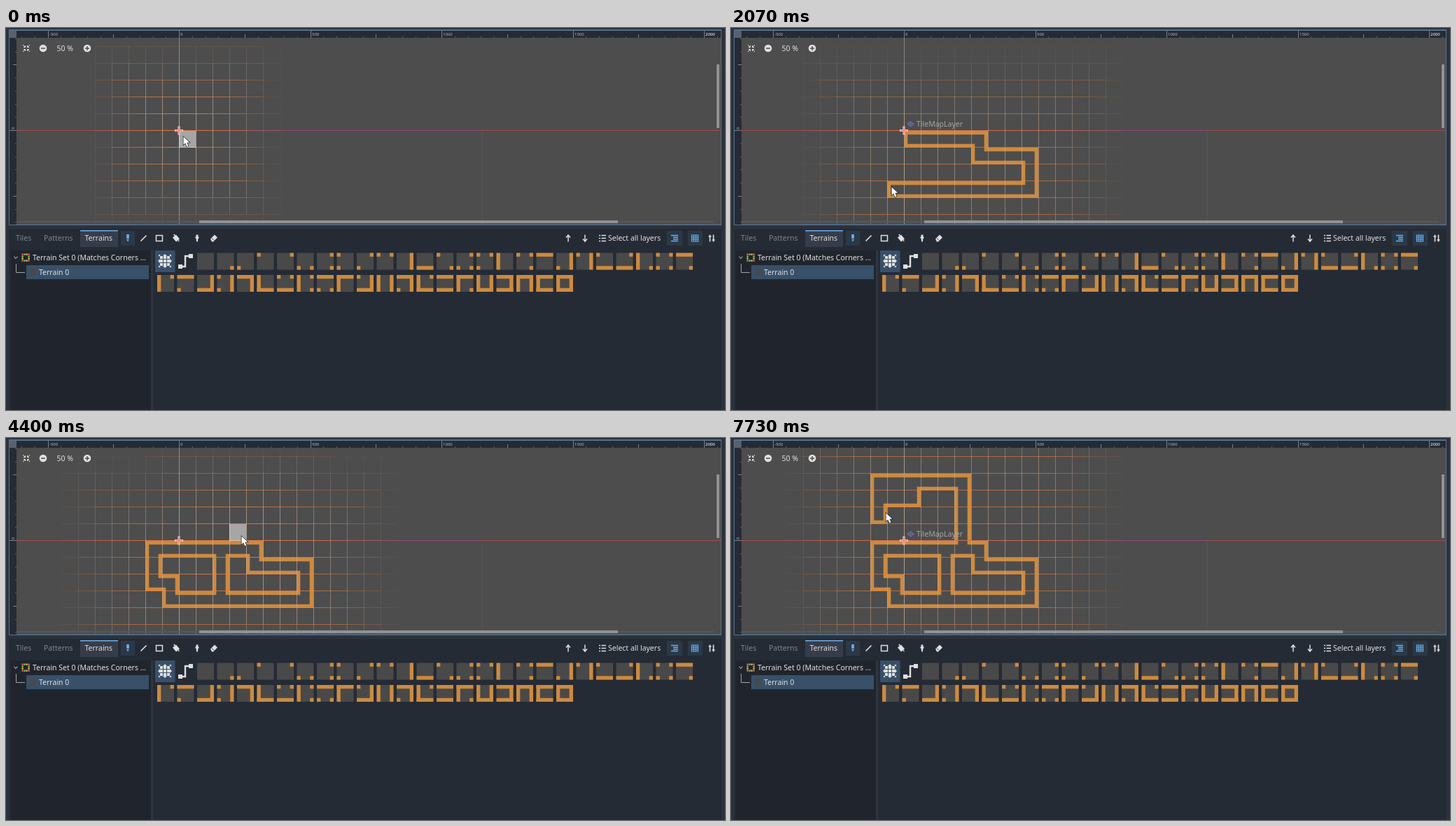
These frames come from a looping animation (1027x546 px, 8 s). An HTML page with a canvas:

```html
<!DOCTYPE html>
<html>
<head>
<meta charset="utf-8">
<style>
html, body { margin: 0; width: 100%; height: 100%; overflow: hidden; background: #2b323d; }
canvas { display: block; }
</style>
</head>
<body>
<canvas id="stage" width="1027" height="546"></canvas>
<script>
const g = document.getElementById('stage').getContext('2d');
const ORANGE = '#cd8a3f', WHITE = '#e0e0e0', BLUE = '#6cb0ee';
const CELL = 24, OX = 247, OY = 147, STEP = 200 / 3, STEPS = 120;

// Pointer path: step, x, y
const path = [
  [0, 253, 155], [1, 253, 155], [2, 253, 156], [3, 253, 156], [4, 258, 157], [8, 352, 161],
  [9, 358, 173], [10, 373, 174], [16, 408, 182], [17, 420, 183], [21, 427, 205],
  [23, 427, 228], [24, 410, 230], [29, 290, 230], [30, 238, 228], [31, 229, 227],
  [34, 233, 223], [36, 232, 206], [37, 213, 204], [41, 211, 160], [44, 251, 158],
  [50, 251, 158], [51, 258, 160], [53, 312, 168], [55, 312, 168], [60, 308, 226],
  [62, 308, 222], [66, 336, 140], [68, 336, 140], [76, 334, 60], [78, 334, 60],
  [84, 215, 58], [85, 210, 58], [88, 210, 58], [91, 211, 84], [96, 239, 82],
  [98, 239, 82], [103, 256, 81], [105, 256, 81], [110, 212, 86], [116, 221, 107], [120, 221, 107]
];
// Steps during which the button is held
const strokes = [[4, 50], [56, 62], [69, 105], [111, 120]];

// Upper case: bars on sides; lower case: corners clockwise from top left
const tiles = ('- c d a b cd bc ad bd ab R B ac bcd abd L abc T Rd Ra Ba Bb Lc abcd Tc ' +
  'Lb Td RB Rad TR LB Bab Lbc Tcd TL RBa LR TRd LBb TB TLc LRB TRB TLR TLB TRBL').split(' ');

function box(x, y, w, h, color) {
  g.fillStyle = color;
  g.fillRect(x, y, w, h);
}

function text(s, x, y, color = WHITE, size = 10.5) {
  g.font = size + 'px "Noto Sans", sans-serif';
  g.fillStyle = color;
  g.fillText(s, x, y);
}

function shape(d, x, y, color, width) {
  const p = new Path2D(d);
  g.save();
  g.translate(x, y);
  if (width) {
    g.strokeStyle = color;
    g.lineWidth = width;
    g.stroke(p);
  } else {
    g.fillStyle = color;
    g.fill(p);
  }
  g.restore();
}

function disc(x, y, r, color) {
  g.fillStyle = color;
  g.beginPath();
  g.arc(x, y, r, 0, 7);
  g.fill();
}

function drawTile(x, y, spec) {
  const w = 5.3, far = CELL - w;
  const parts = {
    T: [0, 0, CELL, w], R: [far, 0, w, CELL], B: [0, far, CELL, w], L: [0, 0, w, CELL],
    a: [0, 0, w, w], b: [far, 0, w, w], c: [far, far, w, w], d: [0, far, w, w]
  };
  for (const k of spec) {
    if (k === '-') continue;
    const [dx, dy, pw, ph] = parts[k];
    box(x + dx, y + dy, pw, ph, ORANGE);
  }
}

function pointer(n) {
  const i = Math.max(1, path.findIndex(k => k[0] >= n));
  const [n0, x0, y0] = path[i - 1], [n1, x1, y1] = path[i];
  const f = (n - n0) / (n1 - n0);
  return [x0 + (x1 - x0) * f, y0 + (y1 - y0) * f];
}

function cellAt(n) {
  const [x, y] = pointer(n);
  return [Math.floor((x - OX) / CELL), Math.floor((y - OY) / CELL)];
}

// Painting trails the pointer by one step
function paintedCells(n) {
  const cells = new Map();
  for (const [from, to] of strokes) {
    if (n < from) break;
    const end = Math.max(from, Math.min(n - 1, to));
    for (let s = from; s <= end; s += 0.25) {
      const c = cellAt(s);
      cells.set(c.join(), c);
    }
  }
  return cells;
}

function tileSpec(cells, c, r) {
  const at = (dx, dy) => cells.has([c + dx, r + dy].join());
  const t = at(0, -1), b = at(0, 1), l = at(-1, 0), e = at(1, 0);
  let s = (t ? '' : 'T') + (e ? '' : 'R') + (b ? '' : 'B') + (l ? '' : 'L');
  if (t && l && !at(-1, -1)) s += 'a';
  if (t && e && !at(1, -1)) s += 'b';
  if (b && e && !at(1, 1)) s += 'c';
  if (b && l && !at(-1, 1)) s += 'd';
  return s || '-';
}

// Grid around a cell rectangle, fading over five cells
function drawGrid(x0, y0, x1, y1) {
  const fade = 5;
  x0 -= fade; y0 -= fade; x1 += fade; y1 += fade;
  for (let c = x0; c < x1; c++) {
    for (let r = Math.max(y0, -7); r < Math.min(y1, 6); r++) {
      const near = Math.min(c - x0, x1 - c - 1, r - y0, y1 - r - 1);
      g.globalAlpha = Math.min(1, near / fade + 0.1);
      const x = OX + c * CELL, y = OY - 1 + r * CELL;
      for (const d of [0, CELL]) {
        box(x, y + d, CELL, 1, 'rgba(235,125,55,.42)');
        box(x + d, y, 1, CELL, 'rgba(205,175,155,.32)');
      }
    }
  }
  g.globalAlpha = 1;
}

function drawRulers() {
  box(5, 4, 1016, 10, '#252b35');
  box(5, 4, 10, 277, '#252b35');
  box(5, 4, 10, 10, '#59616f');
  for (let i = -12; i <= 41; i++) {
    const p = i * 18.75, len = i % 10 === 0 ? 10 : i % 5 === 0 ? 5 : 2;
    const color = len > 2 ? '#7b828d' : '#59606b';
    const x = Math.round(OX + p), y = Math.round(OY - 1 + p);
    if (x > 15 && x < 1020) box(x, 14 - len, 1, len, color);
    if (y > 14 && y < 280) box(15 - len, y, len, 1, color);
    if (i % 10 === 0) text(String(i * 50), x + 2, 10.5, '#b5b9c0', 6);
  }
  text('2000', 999, 10.5, '#b5b9c0', 6);
  box(997, 4, 1, 10, '#7b828d');
  box(903, 9, 1, 5, '#7b828d');
  g.save();
  g.translate(11.5, 145);
  g.rotate(-Math.PI / 2);
  text('0', 0, 0, '#b5b9c0', 6);
  g.restore();
}

function drawZoom() {
  shape('M-5-5L-2-2M5-5L2-2M-5 5L-2 2M5 5L2 2M-4-1.5H-1.5V-4M4-1.5H1.5V-4M-4 1.5H-1.5V4M4 1.5H1.5V4',
    29, 29, WHITE, 1);
  for (const x of [53, 116]) {
    disc(x, 29, 5.3, WHITE);
    box(x - 3, 28.3, 6, 1.5, '#4d4d4d');
  }
  box(115.3, 26, 1.5, 6, '#4d4d4d');
  text('50 %', 72.5, 33);
}

function drawView(n) {
  const cells = paintedCells(n), list = [...cells.values()];
  const held = strokes.some(([a, b]) => n >= a && n <= b);
  const [hc, hr] = cellAt(n);

  box(4, 2, 1018, 280, '#54718f');
  box(5, 4, 1016, 276.5, '#4d4d4d');
  g.save();
  g.beginPath();
  g.rect(15, 14, 1006, 266);
  g.clip();

  for (const [c, r] of list) drawTile(OX + c * CELL, OY + r * CELL, tileSpec(cells, c, r));
  box(15, 146, 1006, 1, '#a34a4e');
  box(OX, 146, 433, 1, '#914a72');
  box(679.5, 147, 1, 134, '#5c5559');
  box(OX, 14, 1, 267, '#858585');

  if (list.length) {
    const cs = list.map(p => p[0]), rs = list.map(p => p[1]);
    drawGrid(Math.min(...cs), Math.min(...rs), Math.max(...cs) + 1, Math.max(...rs) + 1);
  } else {
    drawGrid(0, 0, 0, 0);
  }
  if (!held) {
    drawGrid(hc, hr, hc + 1, hr + 1);
    box(OX + hc * CELL, OY + hr * CELL, CELL, CELL, 'rgba(255,255,255,.5)');
  }

  shape('M-6 0H6M0-6V6', 247, 146.5, '#f0d5d0', 3.2);
  shape('M-5 0H5M0-5V5', 247, 146.5, '#f2857a', 1.8);
  if (cells.has([hc, hr].join())) {
    shape('M-5.5 0L0-4.5L5.5 0L0 4.5Z', 256.5, 137.3, '#626c98');
    shape('M-2.7-2.3L2.7 2.3M2.7-2.3L-2.7 2.3', 256.5, 137.3, '#4d4d4d', 0.7);
    text('TileMapLayer', 265, 141, '#a6a6a6');
  }
  g.restore();

  drawRulers();
  drawZoom();
  box(1015, 52, 4, 91, '#929292');
  box(15, 276, 996, 2, '#575757');
  box(276, 275, 598, 4, '#929292');
}

function drawToolbar() {
  box(4, 287, 1018, 259, '#252b35');
  box(106, 289, 54, 24, '#363d4a');
  box(106, 289, 54, 1.5, BLUE);
  text('Tiles', 14, 304, '#7f858e');
  text('Patterns', 54, 304, '#7f858e');
  text('Terrains', 112.5, 304);
  box(164, 290, 20, 21, '#2b3947');
  shape('M-1.8-5H1.8V1H-1.8ZM-1.8 2H1.8L0 5.5Z', 174, 300, BLUE);
  shape('M-4 4L4-4', 196.5, 300.5, WHITE, 1.7);
  shape('M-4.5-4H4.5V4H-4.5Z', 219, 300.5, WHITE, 1.5);
  shape('M-5-1L0-5L5 1L0 5ZM3.5 2L5 5L2.5 4ZM-4-5L-2-6L0-1Z', 243, 300.5, WHITE);
  shape('M-1.5-5H1.5V-2H2.5V0H1.5L.8 5H-.8L-1.5 0H-2.5V-2H-1.5Z', 273, 300.5, WHITE);
  shape('M-5 1L1-5L5-1L-1 5H-3Z', 297, 300.5, WHITE);
  shape('M-3 0L0 3', 297, 300.5, '#252b35', 1);
  shape('M0 5V-4M-3-1L0-4.5L3-1', 803, 300.5, WHITE, 1.5);
  shape('M0-5V4M-3 1L0 4.5L3 1', 827, 300.5, WHITE, 1.5);
  shape('M-5-4H-3M-5 0H-3M-5 4H-3M-1.5-4H5M-1.5 0H5M-1.5 4H5', 852, 300.5, WHITE, 1.7);
  text('Select all layers', 860, 304);
  box(944, 290, 22, 21, '#2b3947');
  box(974, 290, 21, 21, '#2b3947');
  shape('M-5-4H5M-2-1.3H5M-2 1.3H5M-5 4H5', 955, 300.5, BLUE, 1.4);
  shape('M-4.5-4.5H4.5V4.5H-4.5ZM-1.5-4.5V4.5M1.5-4.5V4.5M-4.5-1.5H4.5M-4.5 1.5H4.5', 984, 300.5, BLUE, 1.2);
  shape('M-2.5-5V5M2.5-5V5M-4.5-2.5H-.5M.5 2.5H4.5', 1008, 300.5, WHITE, 1.6);
}

function drawTree() {
  box(7, 318, 200, 228, '#20252d');
  box(207, 318, 3, 228, '#2f3642');
  shape('M-2.5-1.5L0 1.5L2.5-1.5', 14, 328, '#aeb2b9', 1.1);
  const dots = ['#f06a6a', '#8fd66a', '#f0d060'];
  for (let i = 0; i < 16; i++) {
    const c = i % 4, r = i >> 2;
    if (c % 3 && r % 3) continue;
    box(22.5 + c * 3, 322.5 + r * 3, 2.2, 2.2, dots[(c + r) % 3]);
  }
  text('Terrain Set 0 (Matches Corners ...', 38, 332);
  box(29, 339, 175, 20, '#385068');
  shape('M14.5 337V349.5H27', 0, 0, '#a0a4ab', 1);
  box(34, 344, 9, 10, '#494949');
  text('Terrain 0', 47, 353);
}

function drawPalette() {
  box(213, 318, 28.5, 31, '#385068');
  for (let i = 0; i < 9; i++) {
    const c = i % 3 - 1, r = (i / 3 | 0) - 1;
    box(225 + c * 5, 331 + r * 5, 4, 4, WHITE);
  }
  shape('M-10 0L-7-3V3ZM10 0L7-3V3ZM0-10L-3-7H3ZM0 10L-3 7H3ZM-9-9h3l-3 3zM9-9v3l-3-3zM-9 9v-3l3 3zM9 9h-3l3-3z',
    227, 333, WHITE);
  shape('M249 341H256V326H264', 0, 0, WHITE, 2.4);
  box(246, 338, 6, 6, WHITE);
  box(261, 323, 6, 6, WHITE);
  tiles.forEach((spec, i) => {
    const x = i < 25 ? 273 + i * 28.5 : 216 + (i - 25) * 28.5;
    const y = i < 25 ? 321.5 : 353;
    box(x, y, CELL, CELL, '#494949');
    drawTile(x, y, spec);
  });
}

function draw(now) {
  const n = Math.floor((now % 8000 + 4) / STEP) % STEPS;
  box(0, 0, 1027, 546, '#2b323d');
  drawView(n);
  drawToolbar();
  drawTree();
  drawPalette();
  const [x, y] = pointer(n);
  const arrow = 'M.5.5V12L3.2 9.6L5.2 14.4L7.5 13.4L5.5 8.8L9.2 8.6Z';
  shape(arrow, x, y, '#222', 1.4);
  shape(arrow, x, y, '#fff');
}

let start;
function tick(now) {
  start ??= now;
  draw(now - start);
  requestAnimationFrame(tick);
}
requestAnimationFrame(tick);
</script>
</body>
</html>
```
